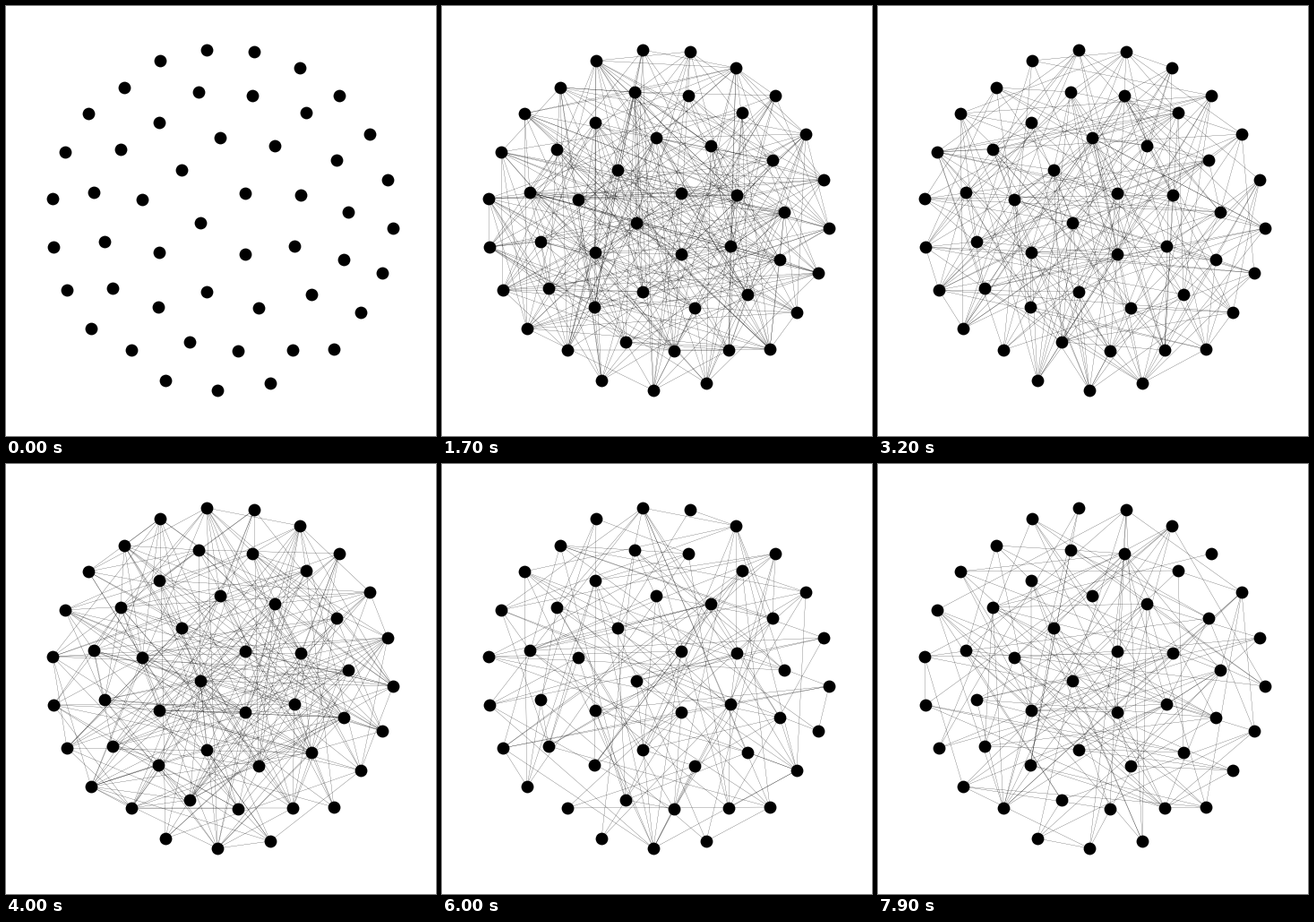
Animation of 480 by 480 pixels, one loop 8000 ms. Source, as a matplotlib script:

```python
import numpy as np
import matplotlib.pyplot as plt
from matplotlib.animation import FuncAnimation
from matplotlib.collections import LineCollection

SIZE, DPI = 480, 80
PT = 72 / DPI  # points per pixel
FRAMES, STEP = 80, 100
CENTER = np.array([241, 238])


def ring(angles, radii):
    """Nodes of one ring, from a few {index: degrees} and {index: radius} keys."""
    index = np.arange(max(angles))
    turn = np.radians(np.interp(index, list(angles), list(angles.values())))
    radius = np.interp(index, list(radii), list(radii.values()))
    offset = np.stack([np.cos(turn), np.sin(turn)], axis=1) * radius[:, None]
    return np.round(CENTER + offset)


NODES = np.concatenate([
    ring({0: 3, 3: 49.2, 4: 73.7, 6: 109.3, 10: 170.7, 12: 203.3,
          15: 248.6, 18: 297.1, 22: 363},
         {0: 191, 2: 187, 3: 191, 6: 191, 7: 178, 8: 190, 13: 190,
          14: 183, 15: 190}),
    ring({0: -3.2, 8: 169.2, 12: 259.6, 16: 356.8},
         {0: 141, 1: 143, 2: 131, 3: 166, 4: 148, 5: 142, 6: 121, 7: 144,
          8: 133, 9: 146, 11: 129, 12: 144, 13: 142, 14: 152, 15: 144}),
    ring({0: -17, 1: 20.3, 2: 67.5, 3: 101.9, 4: 152.1, 5: 193.9, 9: 343},
         {0: 92, 1: 86, 2: 107, 3: 83, 4: 79, 5: 92, 6: 71, 7: 91, 8: 101}),
    ring({0: -48, 1: 56.3, 2: 170.5, 3: 312}, {0: 39, 1: 47, 2: 24}),
])
FIRST, SECOND = np.triu_indices(len(NODES), 1)
PAIRS = np.stack([NODES[FIRST], NODES[SECOND]], axis=1)


def edges_at(step):
    """Fresh random graph for each step, thinning out over the loop."""
    if step == 0:
        return []
    rng = np.random.default_rng(4100 + step)
    prob = np.interp(step, [1, 11, 23, 40, 60, 72, 79],
                     [0.31, 0.33, 0.20, 0.23, 0.11, 0.145, 0.105])
    return PAIRS[rng.random(len(PAIRS)) < prob]


fig = plt.figure(figsize=(SIZE / DPI, SIZE / DPI), dpi=DPI, facecolor="white")
ax = fig.add_axes([0, 0, 1, 1])
ax.set_xlim(0, SIZE)
ax.set_ylim(SIZE, 0)
ax.axis("off")

edges = LineCollection([], colors="black", linewidths=0.21 * PT, zorder=1)
ax.add_collection(edges, autolim=False)
dots = ax.scatter(NODES[:, 0], NODES[:, 1], s=(13.8 * PT) ** 2,
                  color="black", linewidths=0, zorder=2)


def update(step):
    edges.set_segments(edges_at(step))
    # The dots get hard rims once the edges appear
    dots.set_antialiased(step == 0)
    return [edges, dots]


anim = FuncAnimation(fig, update, frames=FRAMES, interval=STEP,
                     repeat=True, repeat_delay=0, blit=False)
plt.show()
```
